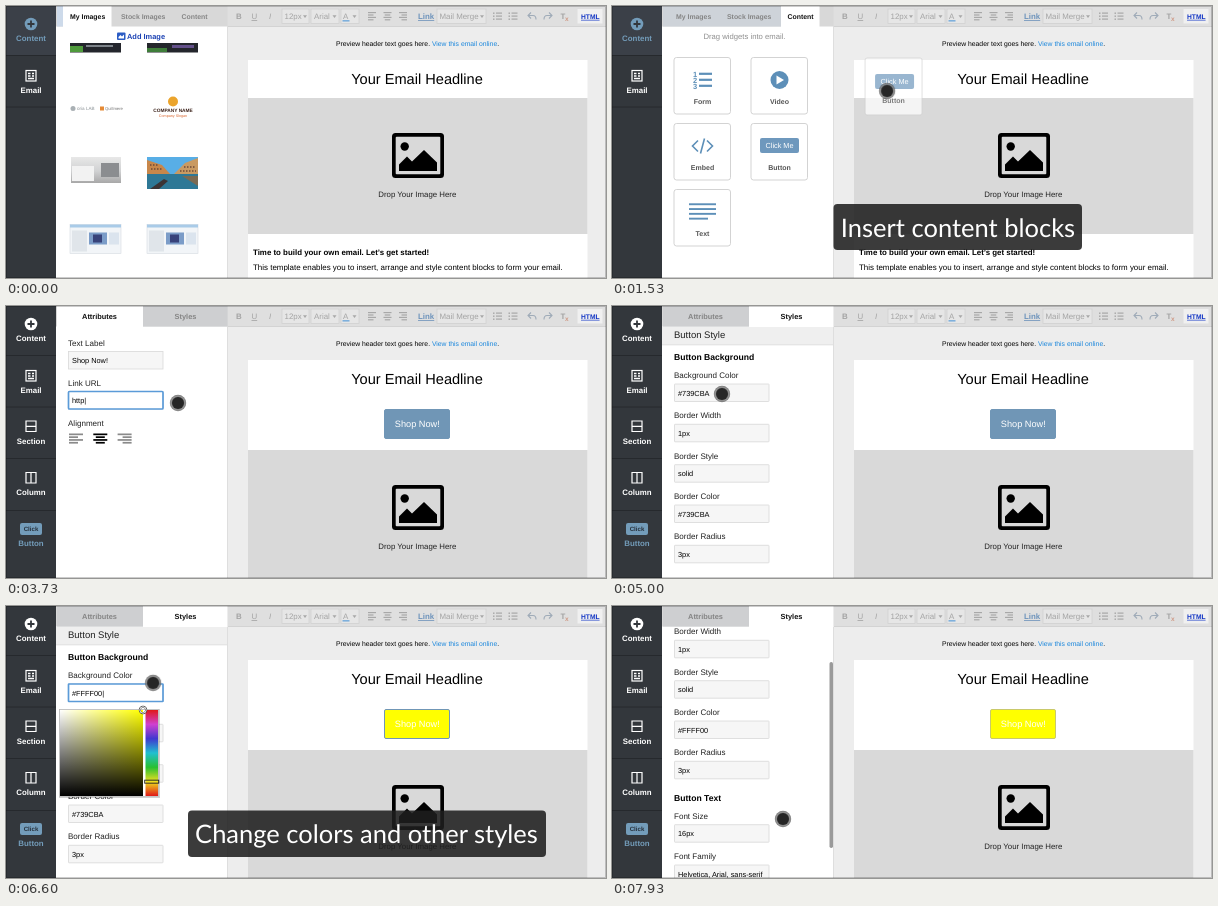
Write an HTML page that moves like this. It is 600 by 272 pixels and loops after 8000 ms.

```html
<!DOCTYPE html>
<html lang="en">
<head>
<meta charset="utf-8">
<title>Email builder demo</title>
<style>
html, body { margin: 0; width: 100%; height: 100%; overflow: hidden; background: #ededed; }
svg { display: block; width: 600px; height: 272px; font-family: "Liberation Sans", Arial, sans-serif; text-rendering: geometricPrecision; }
text { white-space: pre; }
.b { font-weight: bold; }
.mid { text-anchor: middle; }
.side { font-size: 7.9px; font-weight: bold; text-anchor: middle; fill: #fff; }
.on { fill: #5d8fb8; }
.tab { font-size: 6.9px; font-weight: bold; fill: #858585; }
.tab.wide { font-size: 7.4px; text-anchor: middle; }
.tab.cur { fill: #111; }
.label { font-size: 8.05px; fill: #222; }
.head { font-size: 8.6px; font-weight: bold; }
.value { font-size: 7.35px; }
.box { fill: #f6f6f6; stroke: #d9d9d9; stroke-width: .8; }
.ring { fill: #fff; stroke: #5b9bd8; stroke-width: 1.7; }
.sel { fill: #a9c8ec; }
.card { fill: #fff; stroke: #cfcfcf; stroke-width: .9; }
.cap { font: 25.5px Lato, "Open Sans", sans-serif; fill: #fff; text-anchor: middle; }
.small { font-size: 7px; font-weight: bold; fill: #555; text-anchor: middle; }
.tool { font-size: 7.9px; fill: #a3a3a3; }
.line { fill: none; stroke: #5d8fb8; stroke-width: 1.6; }

#cursor, #ghost { animation: move 8s ease-in-out infinite; }
#pointer { animation: appear 8s step-end infinite; }
#cap1 { animation: cap1 8s linear infinite; }
#cap2 { animation: cap2 8s linear infinite; }
#fields { animation: scroll 8s ease-out infinite; }
#thumb { animation: thumb 8s ease-out infinite; }

@keyframes move {
  0%, 2.5% { transform: translate(196px, 64px); }
  5.6%, 6.9% { transform: translate(188px, 12px); }
  11.6%, 12.5% { transform: translate(160px, 150px); }
  19.1% { transform: translate(275px, 85px); }
  21.3%, 24.4% { transform: translate(392px, 112px); }
  28.75%, 41% { transform: translate(114px, 50px); }
  42.5% { transform: translate(140px, 95px); }
  44%, 55.9% { transform: translate(172px, 97px); }
  58.5%, 59.6% { transform: translate(179px, 11px); }
  62%, 65.5% { transform: translate(110px, 88px); }
  69%, 71% { transform: translate(106px, 91px); }
  72.3%, 72.6% { transform: translate(146px, 142px); }
  75.6%, 76.5% { transform: translate(146px, 176px); }
  80.9% { transform: translate(146px, 78px); }
  84%, 86% { transform: translate(148px, 76px); }
  89%, 94.5% { transform: translate(118px, 209px); }
  96%, 100% { transform: translate(171px, 213px); }
}
@keyframes appear { 0% { opacity: 0; } 2.6%, 100% { opacity: 1; } }
@keyframes cap1 {
  0%, 4.5% { opacity: 0; }
  9%, 28.6% { opacity: 1; }
  31.6% { opacity: .3; }
  31.7%, 100% { opacity: 0; }
}
@keyframes cap2 {
  0%, 65% { opacity: 0; }
  69.2%, 89.2% { opacity: 1; }
  93.4%, 100% { opacity: 0; }
}
@keyframes scroll { 0%, 96.4% { transform: translateY(0); } 99%, 100% { transform: translateY(-84px); } }
@keyframes thumb { 0%, 96.4% { transform: translateY(-34px); } 99%, 100% { transform: translateY(0); } }
</style>
</head>
<body>
<svg viewBox="0 0 600 272">
<defs>
  <clipPath id="panelClip"><rect x="50" y="21" width="172" height="251"/></clipPath>
  <linearGradient id="white"><stop stop-color="#fff"/><stop offset="1" stop-color="#fff" stop-opacity="0"/></linearGradient>
  <linearGradient id="black" x2="0" y2="1"><stop stop-opacity="0"/><stop offset="1"/></linearGradient>
  <linearGradient id="hues" x2="0" y2="1"></linearGradient>
  <linearGradient id="office" x2="0" y2="1"><stop stop-color="#e8e8e8"/><stop offset=".55" stop-color="#d0d1d2"/><stop offset="1" stop-color="#a8a8a8"/></linearGradient>
  <g id="shot">
    <rect width="51" height="29" fill="#f2f5f8" stroke="#d5dbe2" stroke-width=".6"/>
    <rect width="51" height="3" fill="#a9cbe8"/>
    <rect x="2" y="6" width="15" height="21" fill="#e0e5ea"/>
    <rect x="19" y="8" width="18" height="12" fill="#7b9cc8"/>
    <rect x="23" y="10" width="9" height="8" fill="#37427a"/>
    <rect x="39" y="8" width="10" height="12" fill="#dbe4ee"/>
  </g>
  <g id="clickMe">
    <rect width="39" height="15" rx="2" fill="#6e98bd"/>
    <text class="mid" x="19.5" y="10.2" font-size="7.3" fill="#fff">Click Me</text>
  </g>
</defs>

<rect width="600" height="272" fill="#ededed"/>

<!-- email -->
<g>
  <text class="mid" x="411.5" y="39.6" font-size="6.8">Preview header text goes here. <tspan fill="#1b87dc">View this email online</tspan>.</text>
  <rect x="242" y="54" width="339.5" height="218" fill="#fff"/>
  <text class="mid" x="411" y="78.2" font-size="14.6">Your Email Headline</text>
  <g data-on="1700-8000">
    <rect id="button" x="378.5" y="103.5" width="65" height="29" rx="1.5"/>
    <text id="buttonText" class="mid" x="411.3" y="121.4" font-size="9.2" fill="#fff"></text>
  </g>
  <g id="lower">
    <rect x="242" y="92" width="339.5" height="136" fill="#d9d9d9"/>
    <rect x="386" y="127" width="52" height="45" rx="3.5"/>
    <rect x="389.7" y="130.7" width="44.6" height="37.6" rx="1" fill="#d9d9d9"/>
    <circle cx="398.7" cy="140.5" r="4.2"/>
    <path d="M393 165V158.500L401 150.500L406 155.500L418 144L431 156.500V165Z"/>
    <text class="mid" x="411.3" y="190.6" font-size="7.85" fill="#222">Drop Your Image Here</text>
    <text class="b" x="247" y="249" font-size="7.9">Time to build your own email. Let’s get started!</text>
    <text x="247" y="264" font-size="7.95">This template enables you to insert, arrange and style content blocks to form your email.</text>
  </g>
</g>

<!-- toolbar -->
<rect x="222" width="378" height="20.5" fill="#dfdfdf"/>
<rect x="222" y="20" width="378" height=".8" fill="#cfcfcf"/>
<g id="toolbar"></g>

<!-- left panel -->
<rect x="50" width="171" height="272" fill="#fff"/>
<rect x="221" width="1" height="272" fill="#dedede"/>
<rect x="50" width="171.5" height="20.5" fill="#d8d8d8"/>

<g data-on="0-480">
  <rect x="51" width="6" height="20.5" fill="#cddaea"/>
  <rect x="57" width="48.5" height="21" fill="#fff"/>
  <text class="tab cur" x="64" y="13">My Images</text>
  <text class="tab" x="115" y="13">Stock Images</text>
  <text class="tab" x="175.5" y="13">Content</text>
  <rect x="111" y="26.5" width="8.5" height="7.5" rx="1" fill="#2b5cc4"/>
  <path d="M112.500 32.500V31L114.500 29L116 30.500L118 28.500V32.500Z" fill="#fff"/>
  <text class="b" x="121" y="33" font-size="7.45" fill="#1d43b4">Add Image</text>
  <g>
    <rect x="64" y="37" width="51" height="9.5" fill="#24262c"/>
    <rect x="64" y="40" width="13" height="6" fill="#4f9a3c"/>
    <rect x="80" y="39" width="27" height="2" fill="#7d8389"/>
    <rect x="141" y="37" width="51" height="9.5" fill="#24262c"/>
    <rect x="141" y="42" width="20" height="4" fill="#3f7d3a"/>
    <rect x="166" y="39" width="22" height="3" fill="#63508a"/>
  </g>
  <circle cx="67" cy="102.5" r="2.5" fill="#a9b0b4"/>
  <text x="71" y="104.3" font-size="4.6" fill="#8b9296">oria LAB</text>
  <rect x="94" y="100.5" width="4" height="4" fill="#e58a35"/>
  <text x="99" y="104.3" font-size="4.2" fill="#777">Quillmere</text>
  <circle cx="167" cy="95.5" r="5" fill="#eba42c"/>
  <text class="b mid" x="167" y="106.3" font-size="4.8" fill="#3a2018">COMPANY NAME</text>
  <text class="mid" x="167" y="110.5" font-size="3.7" fill="#d8622a">Company Slogan</text>
  <rect x="65" y="151" width="50" height="26" fill="url(#office)"/>
  <rect x="66" y="160" width="22" height="15" fill="#f2f2f2"/>
  <rect x="95" y="157" width="18" height="14" fill="#8b8d90"/>
  <g>
    <rect x="141" y="151" width="51" height="32" fill="#58aee6"/>
    <path d="M141 154L156 159L164 168H141Z" fill="#c8874a"/>
    <path d="M192 152L179 157L168 168H192Z" fill="#c99a62"/>
    <path d="M144 159H152M145 163H156M178 161H190M174 165H190" stroke="#6d4a3a" stroke-width="1.4" stroke-dasharray="1.5 1.5"/>
    <rect x="141" y="168" width="51" height="15" fill="#2e7896"/>
    <path d="M144 183L158 173L162 175L153 183Z" fill="#3b3435"/>
    <path d="M192 170L176 170L192 180Z" fill="#7b6a52"/>
  </g>
  <use href="#shot" x="64" y="218.5"/>
  <use href="#shot" x="141" y="218.5"/>
</g>

<g data-on="480-1960">
  <rect x="51" width="118" height="20.5" fill="#ced3d9"/>
  <rect x="169" width="38.5" height="21" fill="#fff"/>
  <text class="tab" x="64" y="13">My Images</text>
  <text class="tab" x="115" y="13">Stock Images</text>
  <text class="tab cur" x="175.5" y="13">Content</text>
  <text class="mid" x="132.5" y="32.6" font-size="7.7" fill="#8f8f8f">Drag widgets into email.</text>
  <g id="cards"></g>
  <g class="on b" font-size="7.5"><text x="81" y="70.5">1</text><text x="81" y="76.7">2</text><text x="81" y="82.9">3</text></g>
  <circle cx="167.5" cy="74" r="9" fill="#5d8fb8"/>
  <path d="M164.500 69.500V78.500L172 74Z" fill="#fff"/>
  <path class="line" d="M86 134.500L80.500 140L86 145.500M95 134.500L100.500 140L95 145.500M92.500 132.500L88.500 147.500"/>
  <use href="#clickMe" x="148" y="132"/>
</g>

<g data-on="1960-8000">
  <rect id="offTab" y="0" height="20.5" fill="#cecfd1"/>
  <rect id="curTab" y="0" height="21" fill="#fff"/>
  <text id="tabA" class="tab wide" x="93.5" y="12.5">Attributes</text>
  <text id="tabB" class="tab wide" x="179.5" y="12.5">Styles</text>
</g>

<g data-on="1960-4720">
  <text class="label" x="62" y="40">Text Label</text>
  <rect class="box" x="62.5" y="45.5" width="94.5" height="17.5"/>
  <rect class="ring" data-on="2330-3430" x="62.5" y="45.5" width="94.5" height="17.5" rx="1"/>
  <rect class="sel" data-on="2400-2700" x="86.2" y="49" width="17.5" height="10"/>
  <rect class="sel" data-on="2700-2800" x="66" y="49" width="37.5" height="10"/>
  <text id="labelText" class="value" x="66" y="56.8"></text>
  <text class="label" x="62" y="80">Link URL</text>
  <rect class="box" x="62.5" y="85.5" width="94.5" height="17.5"/>
  <rect class="ring" data-on="3430-4600" x="62.5" y="85.5" width="94.5" height="17.5" rx="1"/>
  <text id="urlText" class="value" x="66" y="97"></text>
  <text class="label" x="62" y="120">Alignment</text>
  <g id="alignIcons"></g>
</g>

<g data-on="4720-8000" clip-path="url(#panelClip)">
  <g id="fields"></g>
  <g id="picker">
    <rect x="53" y="-1" width="101" height="89" opacity=".18"/>
    <rect x="53.5" y="-.5" width="99" height="87" fill="#fff" stroke="#bbb" stroke-width=".8"/>
    <rect id="hueFill" x="54" width="83" height="86"/>
    <rect x="54" width="83" height="86" fill="url(#white)"/>
    <rect x="54" width="83" height="86" fill="url(#black)"/>
    <rect x="139.5" width="12.5" height="86" fill="url(#hues)"/>
    <rect id="hueMark" x="138.7" width="14" height="3" fill="none" stroke="#222" stroke-width=".9"/>
    <g id="spot" fill="none">
      <circle r="3.2" stroke="#333" stroke-width="2"/>
      <circle r="3.2" stroke="#fff"/>
    </g>
  </g>
  <rect id="thumb" data-on="7700-8000" x="217.5" y="56" width="3.5" height="186" rx="1.7" fill="#9a9a9a"/>
</g>

<!-- sidebar -->
<rect width="50" height="272" fill="#33373c"/>
<rect data-on="0-1960" width="50" height="49.5" fill="#3b4048"/>
<path d="M0 49.500H50M0 101H50" stroke="#26292d"/>
<g id="home">
  <circle cx="25" cy="18" r="6.3"/>
  <path d="M25 14.500V21.500M21.500 18H28.500" stroke="#33373c" stroke-width="1.8"/>
  <text x="25" y="34.5" class="side" style="fill: inherit">Content</text>
</g>
<g fill="none" stroke="#fff" stroke-width="1.2">
  <rect x="20" y="64.5" width="10" height="10.5"/>
  <path d="M22 67.500H24.500M26 67.500H28M22 70H24.500M22 72.500H28M26 70H28" stroke-width="1.5"/>
  <g data-on="1960-8000">
    <path d="M0 152.500H50M0 204.500H50" stroke="#26292d" stroke-width="1"/>
    <path d="M20 115H30V125.500H20ZM20 120.300H30M20 166.500H30V177H20ZM25 166.500V177"/>
  </g>
</g>
<text class="side" x="25" y="87">Email</text>
<g data-on="1960-8000">
  <text class="side" x="25" y="137.5">Section</text>
  <text class="side" x="25" y="188.5">Column</text>
  <rect x="14" y="217" width="22" height="12" rx="2" fill="#739cba"/>
  <text class="b mid" x="25" y="225.3" font-size="6.1" fill="#26303a">Click</text>
  <text class="side" x="25" y="239.5" style="fill: #739cba">Button</text>
</g>

<!-- dragged widget -->
<g id="ghost" data-on="1000-1700">
  <g transform="translate(-22 -33)" opacity=".7">
    <rect class="card" width="57" height="57" rx="2"/>
    <use href="#clickMe" x="10" y="16"/>
    <text class="small" x="28.5" y="44.5">Button</text>
  </g>
</g>

<!-- captions -->
<g id="cap1">
  <rect x="221.5" y="198" width="248.500" height="46" rx="4" fill="#1e1e1e" fill-opacity=".87"/>
  <text class="cap" x="346" y="231">Insert content blocks</text>
</g>
<g id="cap2">
  <rect x="182" y="204.5" width="358" height="46.5" rx="4" fill="#1e1e1e" fill-opacity=".87"/>
  <text class="cap" x="360.5" y="237">Change colors and other styles</text>
</g>

<g id="pointer"><g id="cursor">
  <circle r="8.2" fill="#555" fill-opacity=".75"/>
  <circle r="7" fill="none" stroke="#aaa" stroke-opacity=".6" stroke-width=".9"/>
  <circle r="6" fill="#262626"/>
</g></g>
<rect x=".5" y=".5" width="599" height="271" fill="none" stroke="#000" stroke-opacity=".2"/>
</svg>

<script>
const $ = id => document.getElementById(id);
const LOOP = 8000, BLUE = '#739CBA', SHOWN_BLUE = '#7096b6', YELLOW = '#FFFF00';
const BASE = { h: 205.35, s: 71 / 186, v: 186 / 255 };

const text = (x, y, s, cls, extra = '') => `<text x="${x}" y="${y}" class="${cls}" ${extra}>${s}</text>`;

// Stacked bars; align is 0 left, .5 centre, 1 right
function bars(x, y, widths, gap, thick, color, align = 0) {
  const full = Math.max(...widths);
  return widths.map((w, i) =>
    `<rect x="${x + (full - w) * align}" y="${y + i * gap}" width="${w}" height="${thick}" fill="${color}"/>`).join('');
}

function buildToolbar() {
  const gray = '#a8a8a8';
  const arrow = x => `<path d="M${x} 9.300h4l-2 2.600z" fill="${gray}"/>`;
  const frame = (x, w) => `<rect x="${x}" y="3" width="${w}" height="14.5" fill="#e6e6e6" stroke="#cfcfcf" stroke-width=".7"/>`;
  const list = x => bars(x, 6.5, [1.5, 1.5, 1.5], 3, 1.4, gray) + bars(x + 3, 6.5, [6, 6, 6], 3, 1.2, gray);
  const turn = (x, dir) => `<path d="M${x} 9.500h${5 * dir}q${3 * dir} 0 ${3 * dir} 4M${x + 3 * dir} 6.500l${-3 * dir} 3l${3 * dir} 3" fill="none" stroke="#9fabb8" stroke-width="1.100"/>`;
  $('toolbar').innerHTML =
    text(230, 13, 'B', 'tool b') +
    text(245.5, 13, 'U', 'tool', 'text-decoration="underline"') +
    text(263, 13, 'I', 'tool', 'font-style="italic"') +
    frame(276, 27) + text(278.5, 13, '12px', 'tool') + arrow(297) +
    frame(305, 28) + text(308, 13, 'Arial', 'tool') + arrow(326.5) +
    frame(335, 18) + text(337, 12.5, 'A', 'tool') + '<rect x="336.5" y="14" width="7" height="1.6" fill="#7fb0dc"/>' + arrow(346.5) +
    [0, .5, 1].map((a, i) => bars(362 + i * 15.5, 6, [8, 5.5, 8, 5.5], 2.4, 1.2, gray, a)).join('') +
    text(412, 13, 'Link', 'tool b', 'style="fill:#6d93bb" text-decoration="underline"') +
    frame(431, 49) + text(433.5, 13, 'Mail Merge', 'tool') + arrow(474) +
    list(487) + list(502.5) + turn(522, 1) + turn(546, -1) +
    text(554.5, 13, 'T', 'tool b') + text(559, 14.5, 'x', 'tool b', 'style="fill:#cf9a86;font-size:6.5px"') +
    '<rect x="571.5" y="3" width="25" height="14.5" fill="#f0f0f0"/>' +
    text(575, 12.8, 'HTML', 'b', 'font-size="6.7" fill="#1033c4" text-decoration="underline"');
}

function buildCards() {
  const cards = [['Form', 0, 0], ['Video', 1, 0], ['Embed', 0, 1], ['Button', 1, 1], ['Text', 0, 2]];
  $('cards').innerHTML = cards.map(([name, col, row]) => {
    const x = 62 + col * 77, y = 51.5 + row * 66;
    return `<rect class="card" x="${x}" y="${y}" width="56.5" height="56.5" rx="2.5"/>` + text(x + 28.5, y + 46, name, 'small');
  }).join('') +
    bars(87, 66.7, [13, 13, 13], 6, 2.2, '#5d8fb8') +
    bars(77, 197.3, [27, 27, 27, 19], 4.8, 1.9, '#5d8fb8');
}

function buildFields() {
  const rows = [
    ['Background Color', BLUE, 72, 'bgText', '5680-6900'],
    ['Border Width', '1px', 112.3],
    ['Border Style', 'solid', 152.7],
    ['Border Color', BLUE, 193, 'edgeText', '7200-7660'],
    ['Border Radius', '3px', 233.3],
    ['Font Size', '16px', 296.7],
    ['Font Family', 'Helvetica, Arial, sans-serif', 337]
  ];
  const rect = (cls, y, on = '') => `<rect class="${cls}" ${on} x="62.5" y="${y + 6}" width="94.5" height="17.5" rx=".5"/>`;
  $('fields').innerHTML =
    '<rect x="50" y="21" width="171" height="18" fill="#efefef"/><rect x="50" y="38.5" width="171" height=".8" fill="#dcdcdc"/>' +
    text(62, 32.4, 'Button Style', '', 'font-size="9.5" fill="#222"') +
    text(62, 54, 'Button Background', 'head') + text(62, 279, 'Button Text', 'head') +
    rows.map(([name, value, y, id = '', focus]) =>
      text(62, y, name, 'label') + rect('box', y) +
      (focus ? rect('ring', y, `data-on="${focus}"`) : '') +
      (id === 'edgeText' ? `<rect class="sel" data-on="7230-7400" x="66" y="${y + 10}" width="32" height="10"/>` : '') +
      text(66, y + 17.6, value, 'value', id && `id="${id}"`)).join('');
}

const hueStops = ['#e01818', '#d040d0', '#4038d0', '#20c0d0', '#28c030', '#f0e020', '#e01818'];
$('hues').innerHTML = hueStops.map((c, i) => `<stop offset="${i / 6}" stop-color="${c}"/>`).join('');
$('alignIcons').innerHTML = [0, .5, 1].map((a, i) =>
  bars(63 + i * 24.3, 127.5, [14, 9, 14, 9], 2.8, 1.7, i === 1 ? '#000' : '#8a8a8a', a)).join('');
buildToolbar();
buildCards();
buildFields();

const windows = [...document.querySelectorAll('[data-on]')].map(el => [el, ...el.dataset.on.split('-').map(Number)]);

// Visibility, unlike display, keeps the CSS animations running
const show = (el, on) => { el.style.visibility = on ? '' : 'hidden'; };
const part = (t, a, b) => Math.min(1, Math.max(0, (t - a) / (b - a)));
const mix = (a, b, k) => a + (b - a) * k;
const typed = (s, t, a, b) => s.slice(0, Math.ceil(part(t, a, b) * s.length));
const caret = (t, a, b) => t >= a && t < b ? '|' : '';

function hex({ h, s, v }) {
  return '#' + [5, 3, 1].map(n => {
    const k = (n + h / 60) % 6;
    const c = v - v * s * Math.max(0, Math.min(k, 4 - k, 1));
    return Math.round(c * 255).toString(16).padStart(2, '0');
  }).join('').toUpperCase();
}

// Hue slider first, then saturation and brightness
function picked(t) {
  const h = t < 5790 ? mix(BASE.h, 197, part(t, 5710, 5784)) : mix(197, 60, part(t, 5808, 6050));
  const k = part(t, 6120, 6450);
  return { h, s: mix(BASE.s, 1, k), v: mix(BASE.v, 1, k) };
}

function drawPicker(t) {
  const first = t >= 5690 && t < 6900, second = t >= 7230 && t < 7650;
  show($('picker'), first || second);
  const c = first ? picked(t) : t >= 7610 ? { h: 60, s: 1, v: 1 } : BASE;
  $('picker').setAttribute('transform', `translate(0 ${first ? 104 : 225.5})`);
  $('hueFill').setAttribute('fill', `hsl(${c.h} 100% 50%)`);
  $('hueMark').setAttribute('y', (1 - c.h / 360) * 86 - 1.5);
  $('spot').setAttribute('transform', `translate(${54 + c.s * 83} ${(1 - c.v) * 86})`);
}

function drawTabs(styles) {
  const put = (id, x, w) => { $(id).setAttribute('x', x); $(id).setAttribute('width', w); };
  put(styles ? 'curTab' : 'offTab', 137, 84.5);
  put(styles ? 'offTab' : 'curTab', 51, 86);
  $('tabA').classList.toggle('cur', !styles);
  $('tabB').classList.toggle('cur', styles);
}

function draw(t) {
  for (const [el, a, b] of windows) show(el, t >= a && t < b);
  $('home').setAttribute('fill', t < 1960 ? '#739cba' : '#fff');
  $('lower').setAttribute('transform', `translate(0 ${t < 1700 ? 0 : 52})`);
  drawTabs(t >= 4720);

  const label = t < 2800 ? 'Learn more' : typed('Shop Now!', t, 2790, 3300);
  $('labelText').textContent = label + caret(t, 2800, 3430);
  $('buttonText').textContent = label;
  $('urlText').textContent = typed('http://www.example.com', t, 3590, 4380) + caret(t, 3430, 4600);

  $('bgText').textContent = (t < 5710 ? BLUE : hex(picked(t))) + caret(t, 5690, 6900);
  $('edgeText').textContent = t < 7400 ? BLUE : typed(YELLOW, t, 7390, 7610) + caret(t, 7400, 7660);

  $('button').setAttribute('fill', t < 5870 ? SHOWN_BLUE : hex(picked(t - 70)));
  $('button').setAttribute('stroke', t < 7650 ? SHOWN_BLUE : '#c9c96a');
  drawPicker(t);
}

let start;
function tick(now) {
  start ??= now;
  draw((now - start) % LOOP);
  requestAnimationFrame(tick);
}
draw(0);
requestAnimationFrame(tick);
</script>
</body>
</html>
```
